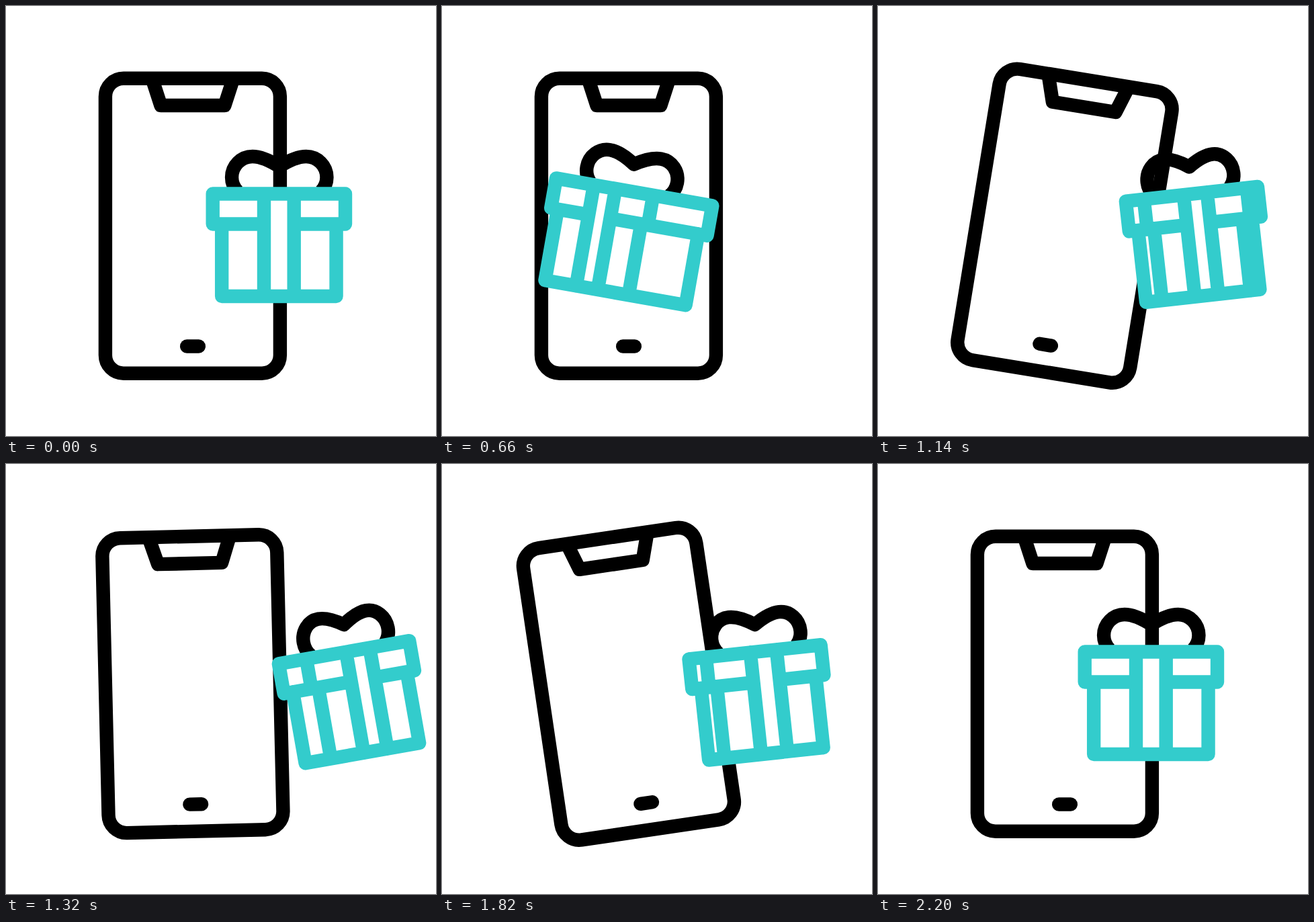
Write an HTML page that moves like this. It is 640 by 640 pixels and loops after 2.42 s.

```html
<!DOCTYPE html>
<html lang="en">
<head>
<meta charset="utf-8">
<title>Gift and phone</title>
<style>
  html, body { margin: 0; width: 100%; height: 100%; overflow: hidden; background: #fff; }
  svg { display: block; width: 100vw; height: 100vh; }
  path, rect { fill: none; stroke: #000; stroke-width: 20.4; stroke-linejoin: round; }
  .cap { stroke-linecap: round; }
  .teal { stroke: #3cc; stroke-linecap: round; }
  .white { fill: #fff; stroke: none; }
</style>
</head>
<body>
<svg viewBox="0 0 640 640">
  <g id="phone">
    <rect x="147.9" y="107.7" width="260" height="439" rx="27"/>
    <path d="M217.4 108 L230.4 148 H325.4 L338.4 108"/>
    <path class="cap" d="M269.2 506.5 H286.8"/>
  </g>
  <g id="gift">
    <path id="bow"/>
    <path id="fill" class="white"/>
    <path id="box" class="teal"/>
  </g>
</svg>
<script>
const LOOP = 2420, STEP = 20;
const LID = 98.65, BODY = 85.2;          // half widths
const TOP = -48, MID = -3, BASE = 104.5; // heights around the gift's pivot
const PIVOT = [406.35, 327.5];

// x, angle, lid front left/right, body front left/right, ribbon left/right, bow x, bow half width
const rest  = [0, 0, -LID, LID, -BODY, BODY, -22.35, 22.35, 0.4, 70.7];
const left  = [-109.5, 10, -137.3, 9.3, -127.2, -1, -80.3, -47.7, -27, 68.2];
const right = [105, -10, -57, LID, -46.7, 87, 3, 38.7, 7, 63.8];
const near  = [-107, ...left.slice(1)];
const giftKeys = [[0, rest], [440, near], [660, left], [1320, right], [1540, right], [2200, rest]];

// The phone rocks between +10 and -10 degrees in nine equal swings.
const SHAKE = 990, SWING = 1210 / 9;
const phoneKeys = Array.from({ length: 10 }, (_, k) =>
  [SHAKE + k * SWING, [k % 9 ? (k % 2 ? 10 : -10) : 0]]);

const el = id => document.getElementById(id);
const [phone, gift, bow, fill, box] = ['phone', 'gift', 'bow', 'fill', 'box'].map(el);
const ease = t => t * t * (3 - 2 * t);

function pose(keys, t) {
  if (t <= keys[0][0]) return keys[0][1];
  for (let i = 1; i < keys.length; i++) {
    const [t0, a] = keys[i - 1], [t1, b] = keys[i];
    if (t < t1) {
      const p = ease((t - t0) / (t1 - t0));
      return a.map((v, j) => v + (b[j] - v) * p);
    }
  }
  return keys[keys.length - 1][1];
}

const vline = (x, y0, y1) => `M${x} ${y0}V${y1}`;
const hline = (y, x0, x1) => `M${x0} ${y}H${x1}`;
const rectPath = (x0, y0, x1, y1) => `M${x0} ${y0}H${x1}V${y1}H${x0}Z`;

function bowPath(cx, half) {
  const lobe = side => {
    const p = (x, y) => `${cx + side * half * x / 70.7} ${y - PIVOT[1]} `;
    return 'M' + p(62, 276) + 'C' + p(67, 271) + p(70.7, 263) + p(70.7, 255) +
      'C' + p(70.7, 238) + p(57, 224) + p(40, 224) +
      'C' + p(26, 224) + p(11, 232) + p(0, 239);
  };
  // Both lobes meet in one path so that the dip gets a round join.
  const mirror = (x, y) => `${cx + half * x / 70.7} ${y - PIVOT[1]} `;
  return lobe(-1) +
    'C' + mirror(11, 232) + mirror(26, 224) + mirror(40, 224) +
    'C' + mirror(57, 224) + mirror(70.7, 238) + mirror(70.7, 255) +
    'C' + mirror(70.7, 263) + mirror(67, 271) + mirror(62, 276);
}

function draw(t) {
  const [tilt] = pose(phoneKeys, t);
  phone.setAttribute('transform', `rotate(${tilt} 277.9 327.2)`);

  const [x, angle, lid0, lid1, body0, body1, rib0, rib1, bowX, bowHalf] = pose(giftKeys, t);
  const lidL = Math.min(-LID, lid0), lidR = Math.max(LID, lid1);
  const bodyL = Math.min(-BODY, body0), bodyR = Math.max(BODY, body1);
  gift.setAttribute('transform', `translate(${PIVOT[0] + x} ${PIVOT[1]}) rotate(${angle})`);
  bow.setAttribute('d', bowPath(bowX, bowHalf));
  fill.setAttribute('d', rectPath(lidL, TOP, lidR, MID) + rectPath(bodyL, MID, bodyR, BASE));
  box.setAttribute('d', [
    hline(TOP, lidL, lidR), hline(MID, lidL, rib0), hline(MID, rib1, lidR), hline(BASE, bodyL, bodyR),
    ...[lidL, lid0, lid1, lidR].map(v => vline(v, TOP, MID)),
    ...[bodyL, body0, body1, bodyR].map(v => vline(v, MID, BASE)),
    ...[rib0, rib1].map(v => vline(v, TOP, BASE))
  ].join(''));
}

const start = performance.now();
function tick() {
  const t = (performance.now() - start) % LOOP;
  draw(t - t % STEP);
  requestAnimationFrame(tick);
}
tick();
</script>
</body>
</html>
```
